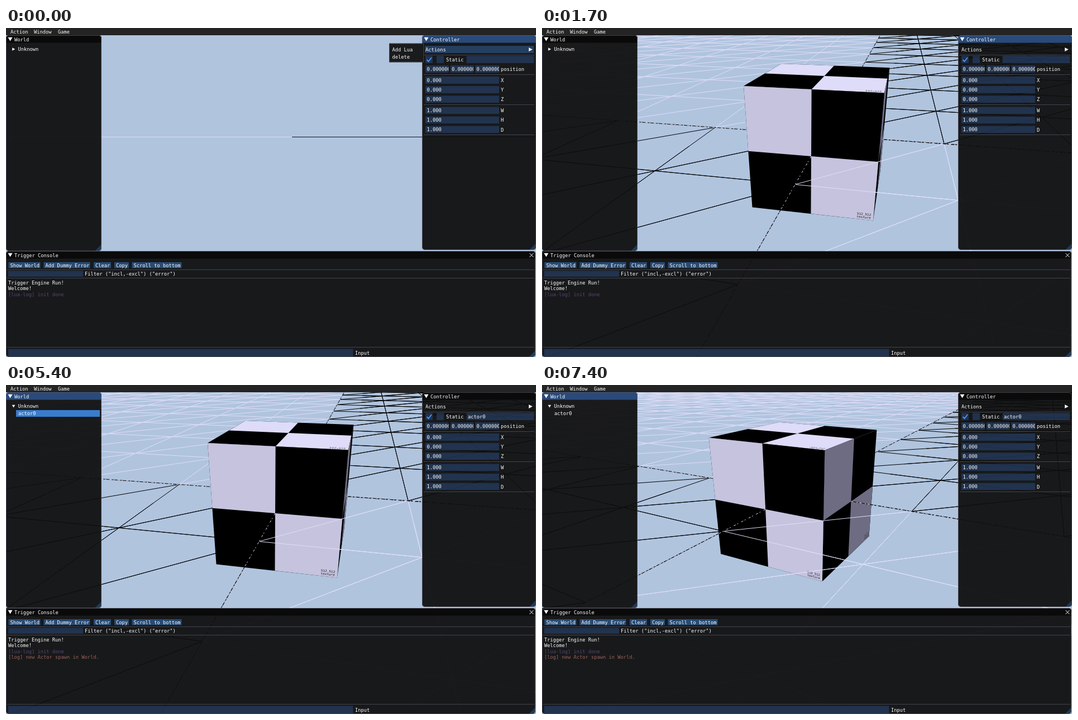
An HTML page with a canvas that plays this animation: 949x590 px, repeating every 8000 ms.

```html
<!DOCTYPE html>
<html lang="en">
<head>
<meta charset="utf-8">
<title>Engine editor</title>
<style>
html, body { margin: 0; width: 100%; height: 100%; overflow: hidden; background: #b0c4de; }
canvas { display: block; }
</style>
</head>
<body>
<canvas id="stage" width="949" height="590"></canvas>
<script>
const g = document.getElementById('stage').getContext('2d');
const MONO = '"DejaVu Sans Mono", monospace';
const FOCAL = 712, CX = 474.5, CY = 295, NEAR = 0.1, GRID = 30;
const LIGHT = '#dfddf8', BLACK = '#000';
const BLUE = '#294a7a', FRAME = 'rgba(41,74,122,.54)', LINE = 'rgba(110,110,128,.5)';
const accent = a => `rgba(66,150,250,${a})`;

// time, camera x, y, z, yaw, pitch (degrees)
const PATH = [
  [600, 0, 0, 0, 3, 8],
  [800, .05, .09, .3, 6, 12.5],
  [1000, .165, .307, 1.013, 9.6, 17.3],
  [1400, .555, 1.08, 3.13, 12.2, 26.6],
  [1600, .555, 1.08, 3.13, 12.2, 26.6],
  [1700, .5735, 1.116, 3.233, 12.5, 27],
  [6000, .5735, 1.116, 3.233, 12.5, 27],
  [6300, .856, 1.093, 3.188, 15.3, 26.5],
  [6900, 1.431, 1.045, 3.015, 25.6, 25.6],
  [7400, 1.684, 1.028, 2.888, 28.9, 25.26]
];

let eye, sinYaw, cosYaw, sinPitch, cosPitch;

const mix = (p, q, k) => p.map((v, i) => v + (q[i] - v) * k);

function setCamera(t) {
  let i = PATH.findIndex(k => k[0] > t);
  if (i < 0) i = PATH.length;
  const p = PATH[Math.max(i - 1, 0)], q = PATH[Math.min(i, PATH.length - 1)];
  const k = q[0] > p[0] ? Math.max(0, (t - p[0]) / (q[0] - p[0])) : 0;
  const [, x, y, z, yaw, pitch] = mix(p, q, k);
  const rad = Math.PI / 180;
  eye = [x, y, z];
  sinYaw = Math.sin(yaw * rad); cosYaw = Math.cos(yaw * rad);
  sinPitch = Math.sin(pitch * rad); cosPitch = Math.cos(pitch * rad);
}

function toCam(p) {
  const [x, y, z] = p.map((v, i) => v - eye[i]);
  const fwd = -x * sinYaw - z * cosYaw;
  return [x * cosYaw - z * sinYaw, fwd * sinPitch + y * cosPitch, fwd * cosPitch - y * sinPitch];
}
const toScreen = ([x, y, d]) => [CX + FOCAL * x / d, CY - FOCAL * y / d];
const inFront = p => p[2] - NEAR;

// Part of the segment where f >= 0
function cut(p, q, f) {
  const u = f(p), v = f(q);
  if (u < 0 && v < 0) return null;
  if (u >= 0 && v >= 0) return [p, q];
  const m = mix(p, q, u / (u - v));
  return u < 0 ? [m, q] : [p, m];
}

function addLine(path, x1, z1, x2, z2, keep) {
  let s = [[x1, 0, z1], [x2, 0, z2]];
  if (keep) s = cut(s[0], s[1], keep);
  if (s) s = cut(toCam(s[0]), toCam(s[1]), inFront);
  if (!s) return;
  path.moveTo(...toScreen(s[0]));
  path.lineTo(...toScreen(s[1]));
}

function ground(keep) {
  const light = new Path2D(), dark = new Path2D(), axes = new Path2D();
  const add = (a, b, c, d) => addLine((a + c) * (b + d) > 0 ? light : dark, a, b, c, d, keep);
  for (const s of [-GRID, GRID]) {
    addLine(axes, 0, 0, s, 0, keep);
    addLine(axes, 0, 0, 0, s, keep);
    for (let i = -GRID; i <= GRID; i++) if (i) {
      add(i, 0, i, s);
      add(0, i, s, i);
    }
  }
  for (let k = -2 * GRID + 1; k < 2 * GRID; k++) {
    const lo = Math.max(-GRID, k - GRID), hi = Math.min(GRID, k + GRID);
    const stops = [lo, ...[0, k].filter(v => v > lo && v < hi).sort((a, b) => a - b), hi];
    for (let i = 1; i < stops.length; i++)
      add(stops[i - 1], k - stops[i - 1], stops[i], k - stops[i]);
  }
  const stroke = (path, color) => { g.strokeStyle = color; g.stroke(path); };
  g.lineWidth = 1;
  stroke(light, LIGHT);
  stroke(dark, BLACK);
  stroke(axes, BLACK);
  g.setLineDash([4, 6, 2, 3]);
  stroke(axes, LIGHT);
  g.setLineDash([]);
}

function poly(points, color) {
  const out = [], cam = points.map(toCam);
  cam.forEach((p, i) => {
    const s = cut(p, cam[(i + 1) % cam.length], inFront);
    if (s) out.push(...s);
  });
  if (!out.length) return;
  g.fillStyle = color;
  g.beginPath();
  out.forEach(p => g.lineTo(...toScreen(p)));
  g.fill();
}

// at(u, v): face point, u to the right and v down, both 0..1
function face(at, color) {
  const quad = (u, v, s, c) =>
    poly([at(u, v), at(u + s, v), at(u + s, v + s), at(u, v + s)], c);
  quad(0, 0, 1, BLACK);
  quad(0, 0, .5, color);
  quad(.5, .5, .5, color);
  const spots = [at(.98, .96), at(.99, .96), at(.98, .97)].map(toCam);
  if (spots.some(p => inFront(p) < 0)) return;
  const [o, a, b] = spots.map(toScreen);
  g.save();
  g.transform(a[0] - o[0], a[1] - o[1], b[0] - o[0], b[1] - o[1], ...o);
  g.font = '2.6px ' + MONO;
  g.textAlign = 'right';
  g.fillStyle = '#111';
  g.fillText('512_512', 0, 0);
  g.fillText('texture', 0, 2.7);
  g.restore();
}

function scene() {
  rect(0, 0, 949, 590, '#b0c4de');
  if (!eye[1]) {
    rect(0, 195, 512, 1, LIGHT);
    rect(512, 195, 437, 1, '#10141c');
    return;
  }
  ground();
  if (eye[1] > .5) face((u, v) => [u - .5, .5, v - .5], '#dedcf8');
  if (eye[0] > .5) face((u, v) => [.5, .5 - v, .5 - u], '#6e6c83');
  if (eye[2] > .5) {
    face((u, v) => [u - .5, .5 - v, .5], '#c5c3de');
    ground(p => p[2] - .5);
    if (eye[0] > .5) ground(p => p[0] - .5);
  }
}

function rect(x, y, w, h, color) {
  g.fillStyle = color;
  g.fillRect(x, y, w, h);
}

function text(s, x, mid, color = '#fff') {
  g.fillStyle = color;
  g.fillText(s, x, mid + 3);
}

function shape(color, ...pts) {
  g.fillStyle = color;
  g.beginPath();
  pts.forEach(p => g.lineTo(...p));
  g.fill();
}
const arrowDown = (x, y, r) => shape('#fff', [x - r, y - r * .8], [x + r, y - r * .8], [x, y + r * .9]);
const arrowRight = (x, y, r) => shape('#fff', [x - r * .8, y - r], [x + r, y], [x - r * .8, y + r]);
const rule = (x, y, w) => rect(x, y, w, 1, LINE);

function stroke(color, width, ...pts) {
  g.strokeStyle = color;
  g.lineWidth = width;
  g.beginPath();
  pts.forEach(p => g.lineTo(...p));
  g.stroke();
}

function panel(x, y, w, h, title, active) {
  g.save();
  g.beginPath();
  g.roundRect(x, y, w, h, 5);
  g.clip();
  rect(x, y, w, h, 'rgba(15,15,15,.94)');
  rect(x, y, w, 13.5, active ? BLUE : '#0a0a0a');
  shape(accent(.25), [x + w, y + h - 12], [x + w, y + h], [x + w - 12, y + h]);
  g.restore();
  g.strokeStyle = LINE;
  g.lineWidth = 1;
  g.beginPath();
  g.roundRect(x + .5, y + .5, w - 1, h - 1, 5);
  g.stroke();
  arrowDown(x + 7.5, y + 7, 4);
  text(title, x + 15, y + 7.5);
}

function popup(x, y, w, h, items, first, hover) {
  rect(x, y, w, h, 'rgba(20,20,20,.96)');
  g.strokeStyle = LINE;
  g.lineWidth = 1;
  g.strokeRect(x + .5, y + .5, w - 1, h - 1);
  items.forEach((s, i) => {
    const mid = first + i * 12.7;
    if (i === hover) rect(x + 2, mid - 6, w - 4, 12, accent(.8));
    text(s, x + 5.5, mid);
  });
}

function field(x, mid, w, value = '') {
  g.save();
  g.beginPath();
  g.rect(x, mid - 6.5, w, 13);
  g.clip();
  rect(x, mid - 6.5, w, 13, FRAME);
  text(value, x + 2.5, mid);
  g.restore();
}

function world(t) {
  const focused = t >= 3000 && t < 3800 || t >= 4700;
  panel(0, 13, 171, 387, 'World', focused);
  if (t >= 2100 && t < 2200 || t >= 2500 && t < 3300)
    rect(6, 33, 160, 10, accent(t >= 3000 && t < 3100 ? 1 : .8));
  (t >= 3100 ? arrowDown : arrowRight)(13.5, 38, 2.8);
  text('Unknown', 21.5, 38);
  if (t < 4700) return;
  if (t >= 5100 && t < 5600) rect(18, 45, 150, 12, accent(t >= 5300 && t < 5400 ? 1 : .8));
  text('actor0', 22, 51);
}

function controller(t) {
  panel(745, 13, 204, 385, 'Controller', t < 3000);
  if (t < 500) rect(750, 32, 195, 13, accent(.31));
  text('Actions', 751, 39);
  arrowRight(939, 38.5, 3.6);
  rule(748, 48, 198);
  field(751, 56.5, 13);
  stroke('#4296fa', 2, [753.5, 57], [756.5, 60], [762, 53]);
  field(771, 56.5, 13);
  text('Static', 788, 57);
  field(824.5, 56.5, 121, t >= 5300 ? 'actor0' : '');
  for (const x of [751, 795.5, 840]) field(x, 73.5, x > 839 ? 43 : 41.5, '0.000000');
  text('position', 886, 74);
  [...'XYZWHD'].forEach((name, i) => {
    const mid = 93.5 + i * 17.1 + (i > 2 ? 3 : 0);
    field(751, mid, 132, i > 2 ? '1.000' : '0.000');
    text(name, 886, mid + .5);
  });
  for (const y of [83, 137, 191]) rule(748, y, 198);
}

function console_(t) {
  panel(0, 400, 948, 190, 'Trigger Console', false);
  stroke('#fff', 1, [937.5, 404], [944.5, 411]);
  stroke('#fff', 1, [944.5, 404], [937.5, 411]);
  const buttons = [['Show World', 4.5, 57], ['Add Dummy Error', 67.5, 83], ['Clear', 157, 31],
    ['Copy', 194, 26], ['Scroll to bottom', 225.5, 89]];
  for (const [s, x, w] of buttons) {
    rect(x, 420, w, 10.5, accent(.4));
    text(s, x + 3, 425.5);
  }
  rule(2, 433, 944);
  rect(4, 435.5, 134, 10.5, FRAME);
  text('Filter ("incl,-excl") ("error")', 141, 441);
  rule(2, 448, 944);
  text('Trigger Engine Run!', 4, 457);
  text('Welcome!', 4, 467.3);
  text('[lua-log] init done', 4, 477.6, '#57466f');
  if (t >= 4700) text('[log] new Actor spawn in World.', 4, 488, '#99635a');
  rule(2, 572, 944);
  rect(4, 575.5, 617.5, 13.5, FRAME);
  text('Input', 625, 583);
}

function menu(t) {
  rect(0, 0, 949, 13, '#242424');
  if (t >= 3500 && t < 3600) rect(45, 0, 42, 13, accent(.8));
  if (t >= 3600 && t < 4700) rect(87, 0, 32, 13, accent(t < 4100 ? .8 : .31));
  text('Action', 8, 7);
  text('Window', 50, 7);
  text('Game', 93, 7);
  if (t >= 3800 && t < 4700)
    popup(86, 13, 117, 34.5, ['World Name Change', 'Creat new Actor'], 25, t >= 4300 ? 1 : t >= 4200 ? 0 : -1);
}

function draw(now) {
  const t = Math.floor(now % 8000 / 100) * 100;
  setCamera(t);
  scene();
  g.font = '8.72px ' + MONO;
  world(t);
  controller(t);
  console_(t);
  if (t < 400) popup(686, 27.5, 62, 34, ['Add Lua', 'delete'], 39, -1);
  menu(t);
  requestAnimationFrame(draw);
}
requestAnimationFrame(draw);
</script>
</body>
</html>
```
